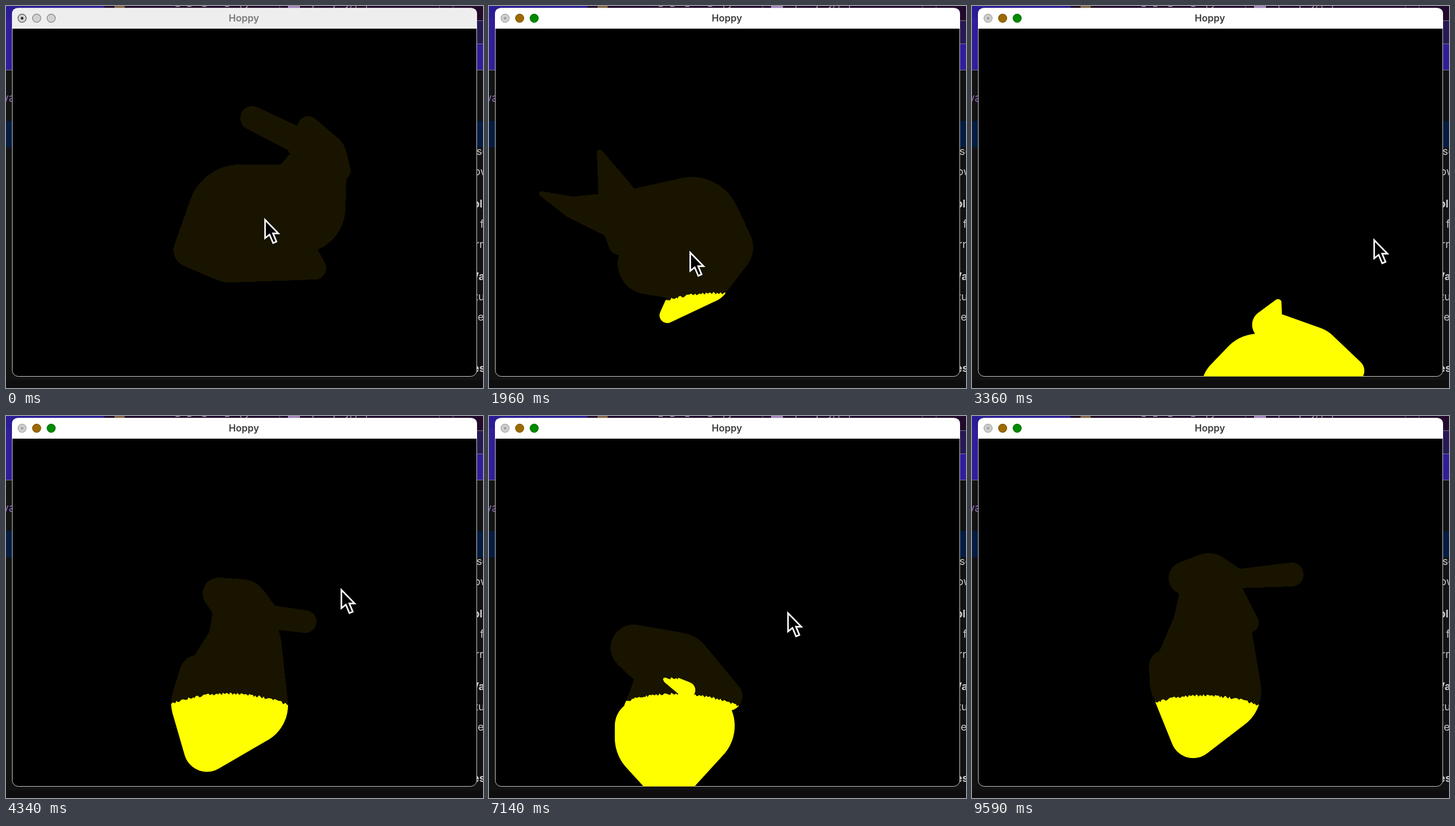
An HTML page for the animation above (9660 ms loop, 800 by 641 pixels).

```html
<!DOCTYPE html>
<html lang="en">
<head>
<meta charset="utf-8">
<title>Hoppy</title>
<style>
html, body { margin: 0; width: 100%; height: 100%; overflow: hidden; background: #121213; }
svg { display: block; width: 100%; height: 100%; }
text { font-family: Inter, "Open Sans", sans-serif; }
</style>
</head>
<body>
<svg viewBox="0 0 800 641">
  <defs>
    <clipPath id="win"><path d="M11 38H789V612Q789 621.5 779 621.5H21Q11 621.5 11 612Z"/></clipPath>
    <clipPath id="bodyClip"><path id="bodyCut" shape-rendering="crispEdges"/></clipPath>
    <clipPath id="earClip"><path id="earCut" shape-rendering="crispEdges"/></clipPath>
  </defs>

  <rect width="800" height="641" fill="#121213"/>
  <rect width="800" height="24" fill="#220a2c"/>
  <rect width="165" height="24" fill="#2a1c96"/>
  <rect y="20" width="12" height="87" fill="#301e9a"/>
  <rect x="788" y="25" width="12" height="38" fill="#271a54"/>
  <rect x="788" y="64" width="12" height="43" fill="#301e9a"/>
  <path d="M0 107.5H12M788 24.5H800M788 63.5H800M788 107.5H800" stroke="#777384"/>
  <path d="M0 193H12V237H0ZM788 193H800V237H788Z" fill="#041c40"/>
  <rect y="628" width="800" height="13" fill="#0e0e10"/>
  <rect x="182" width="17" height="3" fill="#826543"/>
  <rect x="473" width="20" height="4" fill="#a584bd"/>
  <g fill="#b8a9c0" font-size="15">
    <text x="276" y="0">a_ol_mt_ours_copy.ob</text>
    <text x="505" y="0">spare jelly, papers</text>
    <path d="M459 0V4M727 0V4M750 0V4" stroke="#70617a"/>
  </g>
  <text x="-6" y="161" font-size="19" fill="#8d68b5">ya</text>
  <g id="side" fill="#c8c8c8" font-size="18"></g>

  <rect x="10.5" y="3.5" width="779" height="618" rx="10" fill="#000" stroke="#c4c4c4"/>
  <path id="bar" d="M10 38V13.5Q10 3.5 20 3.5H780Q790 3.5 790 13.5V38Z"/>
  <g id="lights"></g>
  <text id="name" x="399" y="26" font-size="16" font-weight="600" text-anchor="middle">Hoppy</text>

  <g clip-path="url(#win)">
    <path id="dark" fill="#181400" shape-rendering="crispEdges"/>
    <g fill="#ff0">
      <g clip-path="url(#bodyClip)"><path id="bodyGlow"/></g>
      <g clip-path="url(#earClip)"><path id="earGlow"/></g>
    </g>
  </g>
  <path id="mouse" d="M1.5 3.8V34.6L9 28.6L15 42.8L20.6 40.4L14.8 26.6H23.8Z"
    fill="#000" stroke="#fff" stroke-width="2.6"/>
</svg>
<script>
const $ = id => document.getElementById(id);
const set = (id, name, value) => $(id).setAttribute(name, value);
const LOOP = 9660, STEP = 70, WAKE = 350, LEAVE = 8890;
const mix = (a, b, k) => a + (b - a) * k;

// The animal is a rig of round joints (x, y, radius), joined by tapered bones
const JOINTS = ['tip', 'ear', 'stub', 'head', 'nose', 'chest', 'rump', 'tail', 'belly', 'foot'];
const BONES = ['tip ear', 'ear head', 'stub head', 'head nose', 'head chest', 'chest rump', 'chest belly',
  'rump tail', 'rump belly', 'tail belly', 'belly foot', 'rump foot'].map(b => b.split(' '));

// level: height on screen below which the body lights up
const pose = (time, mouse, level, joints) => {
  const n = joints.split(/[\s,]+/).map(Number);
  return { time, mouse, level, rig: JOINTS.map((_, i) => n.slice(i * 3, i * 3 + 3)) };
};
const poses = [
  pose(0, [433, 355], 470,
    '413,188,20 490,226,22 507,203,18 528,255,44 560,276,18 495,340,74 393,355,89 309,410,28 375,410,54 518,440,19'),
  pose(1960, [336, 410], 482,
    '88,315,4 140,338,18 186,246,5 228,354,43 220,398,20 340,370,83 395,405,48 268,432,52 362,455,44 299,519,13'),
  pose(3360, [673, 389], 466,
    '513,498,6 495,535,25 638,612,20 565,595,58 620,620,25 480,620,70 440,640,55 460,680,50 520,680,50 560,690,40'),
  pose(4340, [561, 288], 466,
    '502,345,19 440,337,20 357,298,27 395,320,46 430,350,30 400,385,62 340,482,63 322,432,31 405,485,68 337,558,39'),
  pose(5390, [563, 328], 464,
    '515,452,14 470,432,15 365,374,31 400,410,58 435,425,30 400,450,68 345,530,66 325,463,33 410,520,64 340,598,40'),
  pose(7140, [500, 327], 466,
    '332,460,14 300,441,8 243,389,39 315,425,62 400,470,25 300,480,66 285,540,74 255,520,44 340,520,72 302,615,36'),
  pose(9590, [470, 330], 469,
    '536,266,20 445,273,16 358,272,28 397,273,43 465,347,16 402,358,66 358,445,60 325,420,28 415,462,70 371,536,38')
];

// Outline of two circles and the band between them
function bone([ax, ay, ar], [bx, by, br]) {
  const d = Math.hypot(bx - ax, by - ay), dir = Math.atan2(by - ay, bx - ax);
  const open = Math.acos(Math.max(-1, Math.min(1, (ar - br) / (d || 1))));
  const at = (x, y, r, s) => {
    const angle = dir + s * open;
    return `${(x + r * Math.cos(angle)).toFixed(2)} ${(y + r * Math.sin(angle)).toFixed(2)}`;
  };
  if (d <= Math.abs(ar - br)) {
    const [x, y, r] = ar > br ? [ax, ay, ar] : [bx, by, br];
    return `M${x - r} ${y}a${r} ${r} 0 1 1 ${2 * r} 0a${r} ${r} 0 1 1 ${-2 * r} 0Z`;
  }
  const wide = open > Math.PI / 2;
  return `M${at(ax, ay, ar, 1)}A${ar} ${ar} 0 ${+!wide} 1 ${at(ax, ay, ar, -1)}` +
    `L${at(bx, by, br, -1)}A${br} ${br} 0 ${+wide} 1 ${at(bx, by, br, 1)}Z`;
}

const rough = x => { const s = Math.sin(x * 91.7 + 4) * 4375.5; return (s - Math.floor(s) - 0.5) * 4; };

// Everything below a ragged arch
function below(level, centre, bend) {
  let d = 'M0 641';
  for (let x = 0; x <= 800; x += 2)
    d += `L${x} ${(level + bend * (x - centre) ** 2 + rough(x)).toFixed(1)}`;
  return d + 'V641Z';
}

// Slivers of a page behind the window: text, left edge, bold
const sideText = [['so', 789], ['ow', 785], ['bl', 783, 1], ['f', 795], ['rr', 787],
  ['Va', 780, 1], ['tu', 786], ['e', 791], ['es', 783, 1]];
const gaps = [0, 34, 88, 122, 156, 210, 244, 278, 364];
$('side').innerHTML = sideText.map(([s, x, bold], i) =>
  `<text x="${x}" y="${250 + gaps[i]}" font-weight="${bold ? 700 : 400}">${s}</text>`).join('');

function drawChrome(active) {
  set('bar', 'fill', active ? '#fff' : '#efeeef');
  set('name', 'fill', active ? '#3b3b3b' : '#777');
  const fills = active ? ['#cfcfcf', '#9c6a00', '#008a00'] : Array(3).fill('#d3d2d3');
  const rims = active ? ['#a5a5a5', '#805400', '#007000'] : ['#555', '#858585', '#858585'];
  $('lights').innerHTML = fills.map((f, i) =>
    `<circle cx="${27 + i * 24.4}" cy="20.5" r="6.9" fill="${f}" stroke="${rims[i]}" stroke-width="1.2"/>`).join('') +
    `<circle cx="27" cy="20.5" r="2.2" fill="${active ? '#a0a0a0' : '#222'}"/>`;
}

let wasActive;
function draw(t) {
  const active = t >= WAKE;
  if (active !== wasActive) drawChrome(wasActive = active);

  let i = 0;
  while (i < poses.length - 2 && t >= poses[i + 1].time) i++;
  const a = poses[i], b = poses[i + 1];
  const u = Math.min(1, (t - a.time) / (b.time - a.time));
  const k = u * u * (3 - 2 * u);

  const rig = {};
  JOINTS.forEach((name, j) => rig[name] = a.rig[j].map((v, n) => mix(v, b.rig[j][n], k)));
  const shapes = BONES.map(([p, q]) => bone(rig[p], rig[q]));
  const body = shapes.join('');
  set('dark', 'd', body);
  set('bodyCut', 'd', body);
  set('earCut', 'd', shapes[0]);

  // The long ear is nearer, so it lights up higher on screen
  const level = mix(a.level, b.level, k);
  set('bodyGlow', 'd', below(level, (rig.rump[0] + rig.belly[0]) / 2, 0.0018));
  set('earGlow', 'd', below(level - 26, 0, 0));

  const [x, y] = a.mouse.map((v, n) => mix(v, b.mouse[n], k));
  set('mouse', 'transform', `translate(${x.toFixed(1)} ${y.toFixed(1)})`);
  set('mouse', 'visibility', t < LEAVE ? 'visible' : 'hidden');
}

const start = performance.now();
function tick() {
  const t = (performance.now() - start) % LOOP;
  draw(Math.floor(t / STEP) * STEP);
  requestAnimationFrame(tick);
}
tick();
</script>
</body>
</html>
```
